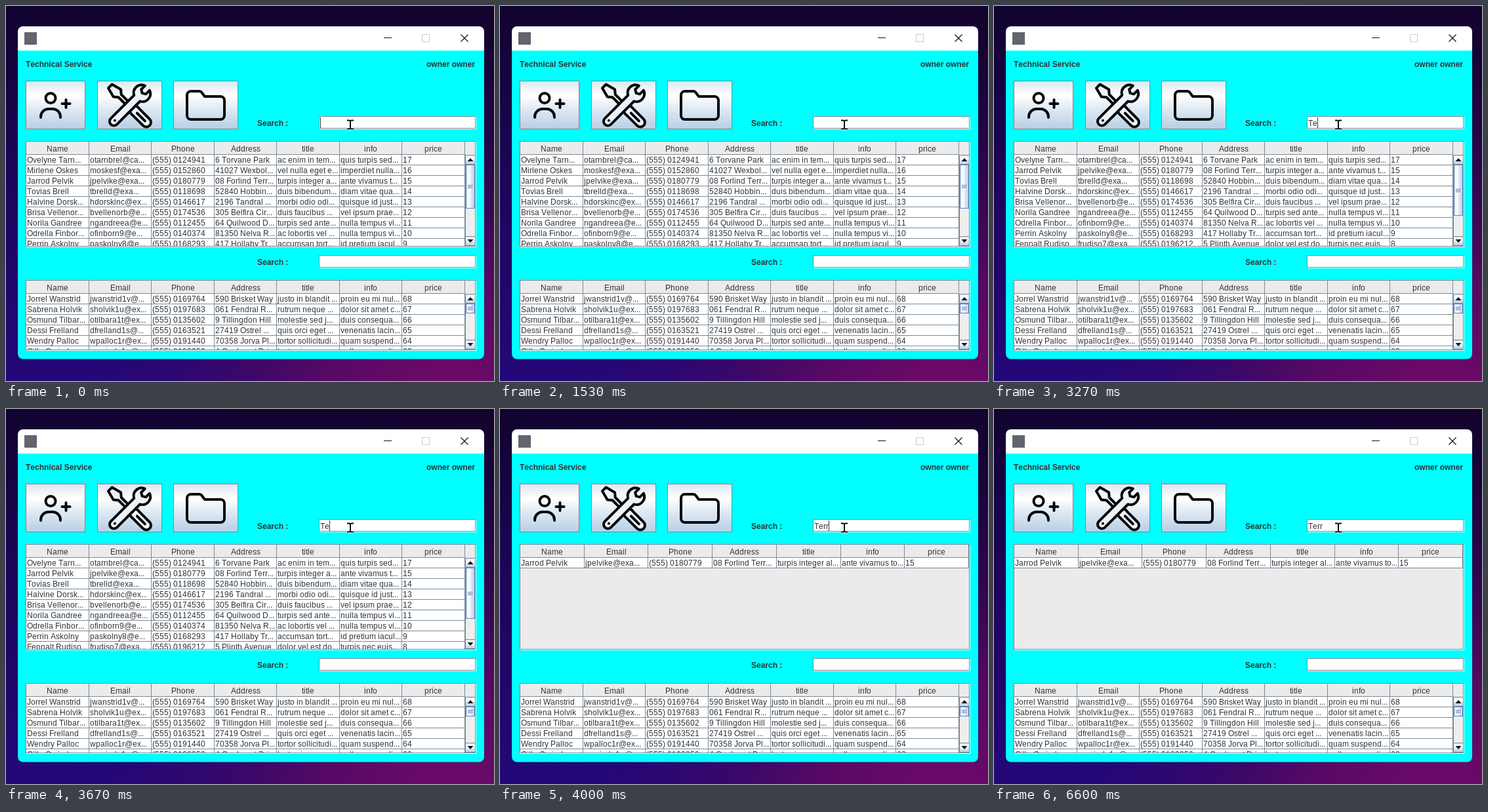
Recreate the animation shown at these times as an HTML page. Size 744x572 px, loop 6.74 s.

```html
<!DOCTYPE html>
<html lang="en">
<head>
<meta charset="utf-8">
<title>Technical Service</title>
<style>
  html, body { margin: 0; width: 100%; height: 100%; overflow: hidden; background: #14042f; }
  svg { display: block; width: 744px; height: 572px; }
  text { font: 12px "Liberation Sans", Arial, sans-serif; fill: #333; font-kerning: none; font-variant-ligatures: none; white-space: pre; }
  text.bold { font-weight: bold; }
  rect { shape-rendering: crispEdges; }
  .icon { fill: none; stroke: #05080c; stroke-width: 4; stroke-linecap: round; stroke-linejoin: round; }
</style>
</head>
<body>
<svg id="stage" viewBox="0 0 744 572" xmlns="http://www.w3.org/2000/svg">
  <defs>
    <linearGradient id="sky" x1="0" y1="0" x2="0" y2="1">
      <stop offset="0" stop-color="#11032e"/><stop offset=".45" stop-color="#1d055a"/><stop offset="1" stop-color="#24087a"/>
    </linearGradient>
    <linearGradient id="dusk" x1="0" y1="0" x2="1" y2="0">
      <stop offset=".4" stop-color="#16032f" stop-opacity="0"/><stop offset="1" stop-color="#16032f" stop-opacity=".8"/>
    </linearGradient>
    <radialGradient id="glow" gradientUnits="userSpaceOnUse" cx="680" cy="610" r="560">
      <stop offset="0" stop-color="#740a6a"/><stop offset=".35" stop-color="#5c0a66" stop-opacity=".9"/><stop offset="1" stop-color="#2c0660" stop-opacity="0"/>
    </radialGradient>
    <linearGradient id="steel" x1="0" y1="0" x2="0" y2="1">
      <stop offset="0" stop-color="#dde8f3"/><stop offset=".3" stop-color="#fff"/><stop offset=".6" stop-color="#dde8f3"/><stop offset="1" stop-color="#b8cfe5"/>
    </linearGradient>
    <linearGradient id="steelAcross" href="#steel" x2="1" y2="0"/>
    <clipPath id="frame"><rect x="18" y="31" width="711" height="507.500" rx="8"/></clipPath>
    <clipPath id="upperClip"><rect x="31" y="207" width="684" height="159"/></clipPath>
    <clipPath id="lowerClip"><rect x="31" y="419" width="684" height="105"/></clipPath>
    <path id="beam" d="M520 174.500h3.500l1.500 1l1.500-1h3.500M525 175v12M520 187.500h3.500l1.500-1l1.500 1h3.500" fill="none"/>
  </defs>
  <rect width="744" height="572" fill="url(#sky)"/>
  <rect width="744" height="572" fill="url(#dusk)"/>
  <rect width="744" height="572" fill="url(#glow)"/>
  <g clip-path="url(#frame)">
    <rect x="18" y="31" width="711" height="37" fill="#fff"/>
    <rect x="18" y="68" width="711" height="471" fill="#0ff"/>
  </g>
  <rect x="28" y="40" width="19" height="19" fill="#62656f"/>
  <rect x="576" y="48" width="12" height="1" fill="#111"/>
  <rect x="634.500" y="43.500" width="11" height="11" fill="none" stroke="#ccc"/>
  <path d="M693.500 43.500l11 11m0-11l-11 11" stroke="#111" stroke-width="1.200"/>
  <g id="panel"></g>
  <g class="icon">
    <circle cx="68" cy="140.500" r="7.500"/>
    <path d="M53 170v-1a12 12 0 0 1 12-12h6a12 12 0 0 1 12 12v1M91.500 143v12M85.500 149h12"/>
    <g transform="translate(188.500 152)" fill="#edf3f9">
      <path transform="rotate(45)" d="M-42-4L-27-8L-21-3H5V3H-21L-27 8L-42 4ZM5-5Q9-8 14-7H36A7 7 0 0 1 36 7H14Q9 8 5 5ZM16 0H33"/>
      <path transform="rotate(-45)" d="M-34-6.500H16A12 12 0 0 1 38-5H30L27 0L30 5H38A12 12 0 0 1 16 6.500H-34A6.500 6.500 0 0 1-34-6.500ZM-32 0h.1"/>
    </g>
    <path d="M276 136a6 6 0 0 1 6-6h13q2 0 3.500 2l4.500 6h24a6 6 0 0 1 6 6v23a6 6 0 0 1-6 6h-45a6 6 0 0 1-6-6z"/>
  </g>
  <g id="upper"></g>
  <g id="lower"></g>
  <g id="query"></g>
  <rect id="caret" y="170" width="1" height="16" fill="#333"/>
  <use href="#beam" stroke="#fff" stroke-width="4"/>
  <use href="#beam" stroke="#080c18" stroke-width="2"/>
</svg>
<script>
const LOOP = 6740, LINE = '#7a8a99';
const byId = id => document.getElementById(id);
const pen = document.createElement('canvas').getContext('2d');

// The interface rounds the glyph advances of its plain face to whole pixels.
const advances = (text, bold) => {
  pen.font = `${bold ? 'bold ' : ''}12px "Liberation Sans", Arial, sans-serif`;
  return [...text].map(c => pen.measureText(c).width).map(w => bold ? w : Math.round(w));
};
const widthOf = (text, bold) => advances(text, bold).reduce((a, b) => a + b, 0);

function label(text, x, y, { bold = false, align = 0 } = {}) {
  let at = Math.round(x - widthOf(text, bold) * align);
  const xs = bold ? [at] : advances(text).map(w => (at += w) - w);
  return `<text${bold ? ' class="bold"' : ''} x="${xs.join(' ')}" y="${y}">${text}</text>`;
}
const box = (x, y, w, h, fill) => `<rect x="${x}" y="${y}" width="${w}" height="${h}" fill="${fill}"/>`;
const bordered = (x, y, w, h, fill, line = LINE) => box(x, y, w, h, line) + box(x + 1, y + 1, w - 2, h - 2, fill);
const sunken = (x, y, w, h, fill) => box(x + 1, y + 1, w - 1, h - 1, '#fff') + bordered(x, y, w - 1, h - 1, fill);

const HEADERS = ['Name', 'Email', 'Phone', 'Address', 'title', 'info', 'price'];

// name | email | address | title | info
const parse = (lines, topPrice) => lines.trim().split('\n').map((line, i) => {
  const [name, email, address, title, info] = line.split('|');
  const phone = `(555) 01${10000 + (topPrice * 6173 + i * 27919) % 90000}`;
  return [name, email, phone, address, title, info, String(topPrice - i)];
});

const upperRows = parse(`
Ovelyne Tarn...|otarnbrel@ca...|6 Torvane Park|ac enim in tem...|quis turpis sed...
Mirlene Oskes|moskesf@exa...|41027 Wexbol...|vel nulla eget e...|imperdiet nulla...
Jarrod Pelvik|jpelvike@exa...|08 Forlind Terr...|turpis integer a...|ante vivamus t...
Tovias Brell|tbrelld@exa...|52840 Hobbin...|duis bibendum...|diam vitae qua...
Halvine Dorsk...|hdorskinc@ex...|2196 Tandral ...|morbi odio odi...|quisque id just...
Brisa Vellenor...|bvellenorb@e...|305 Belfira Cir...|duis faucibus ...|vel ipsum prae...
Norila Gandree|ngandreea@e...|64 Quilwood D...|turpis sed ante...|nulla tempus vi...
Odrella Finbor...|ofinborn9@e...|81350 Nelva R...|ac lobortis vel ...|nulla tempus vi...
Perrin Askolny|paskolny8@e...|417 Hollaby Tr...|accumsan tort...|id pretium iacul...
Fennalt Rudiso...|frudiso7@exa...|5 Plinth Avenue|dolor vel est do...|turpis nec euis...`, 17);

const lowerRows = parse(`
Jorrel Wanstrid|jwanstrid1v@...|590 Brisket Way|justo in blandit ...|proin eu mi nul...
Sabrena Holvik|sholvik1u@ex...|061 Fendral R...|rutrum neque ...|dolor sit amet c...
Osmund Tilbar...|otilbara1t@ex...|9 Tillingdon Hill|molestie sed j...|duis consequa...
Dessi Frelland|dfrelland1s@...|27419 Ostrel ...|quis orci eget ...|venenatis lacin...
Wendry Palloc|wpalloc1r@ex...|70358 Jorva Pl...|tortor sollicitudi...|quam suspend...
Gilla Orvinde|gorvinde1q@e...|4 Quelmont Dri...|lectus in quam...|nulla suspendi...`, 68);

// Wider columns leave room for one more letter in these cells.
const WIDER = { 'turpis integer a...': 'turpis integer al...', 'ante vivamus t...': 'ante vivamus to...' };

function scrollBar(top, bottom, thumbTop, thumbHeight) {
  const arrow = (y, dir) => bordered(700, y, 16, 15, 'url(#steel)') +
    `<path d="M703.500 ${y + 7.5 - 2.5 * dir}h9l-4.500 ${5 * dir}z" fill="#111"/>`;
  const middle = thumbTop + Math.floor(thumbHeight / 2);
  const grips = [-2, 0, 2].map(d => box(704, middle + d, 8, 1, '#6382bf') + box(705, middle + d + 1, 8, 1, '#fff')).join('');
  return bordered(700, top, 16, bottom - top, '#eee') + arrow(top, -1) + arrow(bottom - 15, 1) +
    bordered(701, thumbTop, 14, thumbHeight, 'url(#steelAcross)', '#6382bf') + grips;
}

function table(top, bottom, rows, clip, thumb) {
  const right = thumb ? 700 : 715;
  const edge = k => Math.round(31 + (right - 31) * k / 7);
  const first = top + 21;
  const rowsEnd = Math.min(first + rows.length * 16, bottom - 1);
  let inner = box(31, first, right - 31, rowsEnd - first, '#fff');
  rows.forEach((row, r) => {
    const y = first + r * 16;
    inner += box(31, y + 15, right - 31, 1, LINE);
    row.forEach((cell, c) => inner += label(thumb ? cell : WIDER[cell] || cell, edge(c) + 1, y + 12));
  });
  HEADERS.forEach((name, c) => {
    inner += box(edge(c + 1) - 1, top + 1, 1, rowsEnd - top - 1, LINE) +
      label(name, (edge(c) + edge(c + 1) - 1) / 2, top + 16, { align: .5 });
  });
  inner += box(31, top + 20, right - 31, 1, LINE);
  if (thumb) inner += scrollBar(first, bottom - 1, top + 36, thumb);
  return sunken(30, top, 687, bottom - top + 1, '#ebebec') + `<g clip-path="url(#${clip})">${inner}</g>`;
}

byId('panel').innerHTML =
  label('Technical Service', 30, 93, { bold: true }) +
  label('owner owner', 715, 93, { bold: true, align: 1 }) +
  [[30, 91], [139, 99], [255, 99]].map(([x, w]) => bordered(x, 114, w, 74, 'url(#steel)')).join('') +
  [168, 380].map(y => label('Search :', 383, y + 15, { bold: true }) + sunken(477, y, 240, 20, '#fff')).join('');
byId('lower').innerHTML = table(418, 525, lowerRows, 'lowerClip', 15);

const STEPS = [
  { at: 0, query: '', rows: upperRows, thumb: 67 },
  { at: 2530, query: 'T', rows: upperRows, thumb: 67 },
  { at: 3270, query: 'Te', rows: upperRows.filter((_, i) => i !== 1), thumb: 78 },
  { at: 3730, query: 'Ter', rows: upperRows.slice(2, 5) },
  { at: 3870, query: 'Terr', rows: upperRows.slice(2, 3) }
];
const CARET_OFF = [[530, 1070], [1530, 2070], [3000, 3270], [4400, 4870], [5400, 5870], [6400, LOOP]];

let shown;
function render(t) {
  const step = STEPS.filter(s => s.at <= t).pop();
  if (step !== shown) {
    shown = step;
    byId('upper').innerHTML = table(206, 367, step.rows, 'upperClip', step.thumb);
    byId('query').innerHTML = step.query && label(step.query, 479, 183);
    byId('caret').setAttribute('x', 479 + widthOf(step.query));
  }
  const hidden = CARET_OFF.some(([from, to]) => t >= from && t < to);
  byId('caret').setAttribute('visibility', hidden ? 'hidden' : 'visible');
}

const start = performance.now();
function tick() {
  render((performance.now() - start) % LOOP);
  requestAnimationFrame(tick);
}
tick();
</script>
</body>
</html>
```
